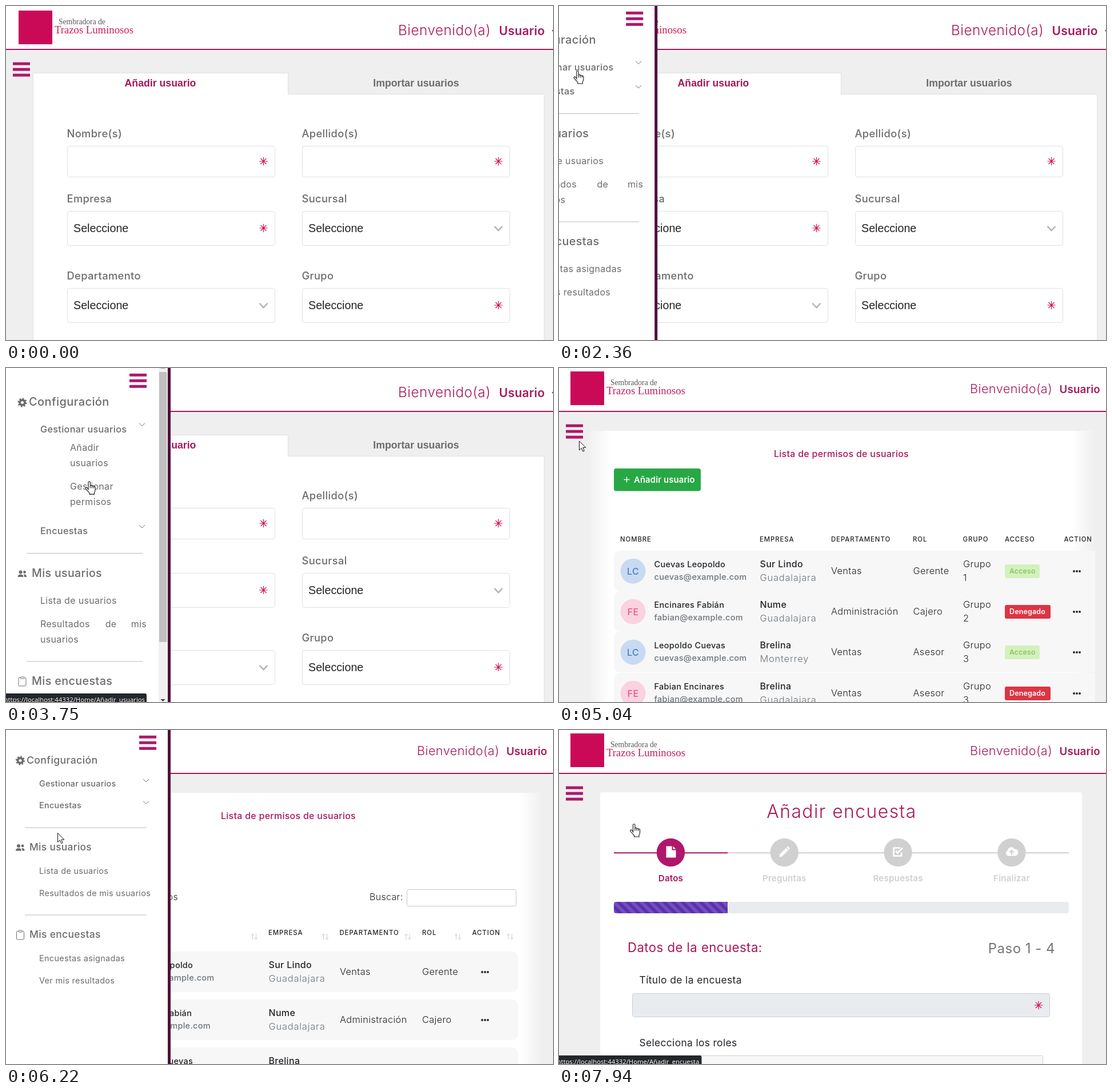
An HTML page that plays this animation: 957x585 px, repeating every 8000 ms.

```html
<!DOCTYPE html>
<html lang="es">
<head>
<meta charset="utf-8">
<title>Panel de usuarios</title>
<style>
  html, body { margin: 0; width: 100%; height: 100%; overflow: hidden; background: #efefef; }
  svg { display: block; width: 100%; height: 100%; }
  text { font-family: Inter, "Open Sans", sans-serif; letter-spacing: .02em; white-space: pre; }
  .light { font-weight: 300; }
  .mid { font-weight: 500; letter-spacing: .02em; }
  .bold { font-weight: 600; letter-spacing: .01em; }
  .airy { letter-spacing: .045em; }
  .head { font-weight: 500; letter-spacing: .9px; }
  .arial { font-family: "Liberation Sans", Arial, sans-serif; letter-spacing: 0; }
  .strong { font-weight: 700; }
  .serif { font-family: "Liberation Serif", Times, serif; letter-spacing: 0; }
  .url { font-family: "Open Sans", "Noto Sans", sans-serif; letter-spacing: 0; }
  .center { text-anchor: middle; }
  .end { text-anchor: end; }
</style>
</head>
<body>
<svg id="stage" viewBox="0 0 957 585" xmlns="http://www.w3.org/2000/svg"></svg>
<script>
const LOOP = 8000, SURVEY_START = 7670;
const WINE = '#a8185c', PINK = '#b0176a', GRAY = '#6c6c6c', INK = '#212529', MUTED = '#6c757d', BACK = '#efefef';
const stage = document.getElementById('stage');

const text = (x, y, s, size, fill, cls = '') =>
  `<text x="${x}" y="${y}" font-size="${size}" fill="${fill}" class="${cls}">${s}</text>`;
const rect = (x, y, w, h, fill, r = 0, stroke = 'none') =>
  `<rect x="${x}" y="${y}" width="${w}" height="${h}" rx="${r}" fill="${fill}" stroke="${stroke}"/>`;
const line = (d, stroke, width = 1, fill = 'none') =>
  `<path d="${d}" fill="${fill}" stroke="${stroke}" stroke-width="${width}"/>`;
const circle = (x, y, r, fill) => `<circle cx="${x}" cy="${y}" r="${r}" fill="${fill}"/>`;
const at = (x, y, body) => `<g transform="translate(${x} ${y})">${body}</g>`;
const chevron = (x, y, w, h, stroke, width) => line(`M${x - w} ${y - h / 2}l${w} ${h} ${w} ${-h}`, stroke, width);
const burger = (x, y) => [0, 10, 20].map(d => rect(x, y + d, 30, 5, PINK)).join('');
const star = (x, y) => at(x, y, line('M0-7.2V7.2M-7.2 0H7.2M-5-5L5 5M-5 5L5-5', '#d5134f', 1.2));

// CSS "ease" curve
function ease(from, to, t) {
  const p = Math.min(1, Math.max(0, (t - from) / (to - from)));
  let lo = 0, hi = 1;
  for (let i = 0; i < 20; i++) {
    const s = (lo + hi) / 2;
    if (.75 * s * (1 - s) + s ** 3 < p) lo = s; else hi = s;
  }
  return .3 * lo * (1 - lo) ** 2 + 3 * (1 - lo) * lo * lo + lo ** 3;
}

const brand = (x, y) => at(x, y,
  rect(10, 0, 59, 59, '#cb0a57') +
  text(80, 24, 'Sembradora de', 13.6, '#58585a', 'serif') +
  text(73, 40, 'Trazos Luminosos', 18.7, '#cb1c56', 'serif'));

const header = (brandX, brandY, greeting) =>
  rect(0, 0, 957, 76, '#fff') + rect(0, 75, 957, 2, WINE) + brand(brandX, brandY) + greeting + burger(12, 98.6);

// Form page
function field(x, y, h, label, required, select) {
  const mid = y + h / 2;
  return text(x - .5, y - 15.5, label, 18.3, GRAY, 'mid') +
    rect(x + .5, y + .5, 363, h, '#fff', 4, '#dedfe1') +
    (select ? text(x + 11, mid + 7, 'Seleccione', 19.7, '#222', 'arial') : '') +
    (required ? star(x + 343.5, mid) : chevron(x + 343.5, mid + .5, 7, 7.5, '#b0b0b0', 2.4));
}

const formPage =
  header(12, 8,
    text(686, 50.5, 'Bienvenido(a)', 24.3, WINE, 'light') +
    text(862.5, 50.5, 'Usuario', 21, WINE, 'bold') +
    circle(957, 43, 1.6, WINE)) +
  line('M47.5 585V117.5H493.5V154.5H941.5V585', '#dee0e3', 1, '#fff') +
  text(270, 141, 'Añadir usuario', 17.7, WINE, 'arial strong center') +
  text(717.5, 141, 'Importar usuarios', 17.7, GRAY, 'arial strong center') +
  field(107, 245, 54, 'Nombre(s)', true) +
  field(518, 245, 54, 'Apellido(s)', true) +
  field(107, 359, 60, 'Empresa', true, true) +
  field(518, 359, 60, 'Sucursal', false, true) +
  field(107, 494, 60, 'Departamento', false, true) +
  field(518, 494, 60, 'Grupo', true, true);

// Permission list page
const smallHeader = header(10, 6,
  text(719, 43.5, 'Bienvenido(a)', 21.6, WINE, 'light') + text(875.5, 43.5, 'Usuario', 18.7, WINE, 'bold'));

const people = [
  ['Cuevas Leopoldo', 'cuevas', 'LC', 'Sur Lindo', 'Guadalajara', 'Ventas', 'Gerente', 1],
  ['Encinares Fabián', 'fabian', 'FE', 'Nume', 'Guadalajara', 'Administración', 'Cajero', 2],
  ['Leopoldo Cuevas', 'cuevas', 'LC', 'Brelina', 'Monterrey', 'Ventas', 'Asesor', 3],
  ['Fabian Encinares', 'fabian', 'FE', 'Brelina', 'Guadalajara', 'Ventas', 'Asesor', 3],
];

function personRow(p, i, y, cols, width) {
  const [name, mail, initials, company, city, area, role, group] = p;
  const odd = i % 2, [nameX, companyX, areaX, roleX, dotsX] = cols;
  const access = odd
    ? rect(780, 24, 80, 24, '#dc3545', 3) + text(788, 40.3, 'Denegado', 12.5, '#fff', 'bold')
    : rect(780, 24, 61, 24, '#d2f1bd', 3) + text(788, 40.3, 'Acceso', 12.3, '#86bf55', 'mid');
  const full = width > 800;
  return at(0, y,
    rect(96, 0, width, 71, '#f7f7f7', 10) +
    circle(nameX - 37, 35.7, 22, odd ? '#fbd2df' : '#c8daf2') +
    text(nameX - 37, 42, initials, 16, odd ? '#e05c85' : '#4382bb', 'mid center') +
    text(nameX, 29, name, 14.5, INK, 'mid') +
    text(nameX, 51, mail + '@example.com', 14.5, MUTED, 'mid') +
    text(companyX, 29, company, 16, INK, 'mid') +
    text(companyX, 53, city, 16.5, MUTED, 'light airy') +
    text(areaX, 41, area, 16.4, INK, 'light') +
    text(roleX, 41, role, 16.4, INK, 'light') +
    (full ? text(707, 29, 'Grupo', 16.4, INK, 'light') + text(707, 53, group, 16.4, INK, 'light') + access : '') +
    [-5, 0, 5].map(d => circle(dotsX + d, 36, 1.9, INK)).join(''));
}

const heads = (y, list) => list.map(([x, s]) => text(x, y, s, 11.4, INK, 'head')).join('');

const listBase = smallHeader +
  rect(50, 110, 888, 475, 'url(#edges)') +
  text(494, 156, 'Lista de permisos de usuarios', 15.9, WINE, 'mid center') +
  rect(96, 176, 152, 39.4, '#28a745', 4) +
  line('M113.5 195.5h10M118.5 190.5v10', '#fff', 1.4) +
  text(131, 200.5, 'Añadir usuario', 14.8, '#fff', 'bold');

const plainList = listBase +
  heads(303.5, [[107, 'NOMBRE'], [351, 'EMPRESA'], [476, 'DEPARTAMENTO'], [619, 'ROL'],
    [706.5, 'GRUPO'], [780, 'ACCESO'], [883.5, 'ACTION']]) +
  people.map((p, i) => personRow(p, i, Math.round(320 + i * 71.2), [166.5, 351.5, 476, 619.5, 906], 860)).join('') +
  rect(938, 110, 19, 475, BACK);

const sorter = x => line(`M${x - 3} 367v-10m-2.5 3l2.5-3 2.5 3M${x + 3} 357v10m-2.5-3l2.5 3 2.5-3`, '#cfcfcf');

const richList = listBase +
  text(96, 298, 'Mostrar', 16, INK, 'light') +
  rect(163.5, 279.5, 58, 29, '#fff', 3, '#c9cdd1') + text(171, 298, '10', 14.4, INK, 'light') +
  chevron(210, 294, 4, 4, '#555', 1.4) +
  text(301, 298, 'registros', 16, INK, 'light end') +
  text(636, 298, 'Buscar:', 16, INK, 'light') +
  rect(701.5, 279.5, 191, 29, '#fff', 3, '#c4c8cc') +
  heads(359, [[143, 'NOMBRE'], [459, 'EMPRESA'], [583.5, 'DEPARTAMENTO'], [728, 'ROL'], [815.5, 'ACTION']]) +
  [434.5, 558.5, 703, 790.5, 882].map(sorter).join('') +
  people.slice(0, 3).map((p, i) => personRow(p, i, 388 + i * 84, [202.5, 459.5, 584, 728, 838], 800)).join('');

// Survey page
const stepIcons = [
  '<path d="M-8-10H2V-3H9V10H-8ZM4-10L9-5H4Z" fill="#fff"/>',
  '<path d="M-9 9l1-5L3-7l4 4L-4 8ZM4-8l2-2 4 4-2 2Z" fill="#fff"/>',
  line('M6 1V7H-7.5V-7H4M-4-2L-1 2 8-7', '#fff', 2.6),
  '<path d="M-6 7a5 5 0 0 1-1-9.5A6.5 6.5 0 0 1 5-5a5.5 5.5 0 0 1 1 12Z" fill="#fff"/>' +
    line('M0 5V-2M-3.5 1L0-2.5 3.5 1', '#d0d0d0', 2),
];
const steps = ['Datos', 'Preguntas', 'Respuestas', 'Finalizar'].map((name, i) => {
  const x = 195.5 + i * 198.8, color = i ? '#d0d0d0' : PINK;
  return circle(x, 214.5, 24.7, color) + at(x, 213.5, stepIcons[i]) +
    text(x, 265, name, 15.2, i ? '#d0d0d0' : WINE, 'bold center');
}).join('');

const surveyPage = smallHeader +
  rect(72, 109, 843, 490, '#fff', 4) +
  text(494.5, 154, 'Añadir encuesta', 31.9, WINE, 'light airy center') +
  rect(96, 214.2, 796, 2, '#d0d0d0') + rect(96, 214.2, 199, 2, PINK) + steps +
  rect(96, 301, 796, 20, '#e9ecef', 4) +
  ['#5a30b0', 'url(#stripes)'].map(fill => `<path d="M295 301V321H100a4 4 0 0 1-4-4V305a4 4 0 0 1 4-4Z" fill="${fill}"/>`).join('') +
  text(120, 389, 'Datos de la encuesta:', 22.2, WINE) +
  text(868, 391, 'Paso 1 - 4', 24, '#757575', 'end') +
  text(140.5, 443.5, 'Título de la encuesta', 17.5, INK) +
  rect(128.5, 461.5, 730, 41, '#e9ecef', 4, '#c9cdd2') + star(839, 482) +
  text(140.5, 554, 'Selecciona los roles', 17.4, INK) +
  rect(141.5, 570.5, 705, 40, '#f8f8f8', 2, '#cfcfcf');

// Side menu
const gear = (x, y) => at(x, y,
  `<g fill="none" stroke="${GRAY}"><circle r="4.4" stroke-width="3.6"/><circle r="6.8" stroke-width="2.6" stroke-dasharray="2.67"/></g>`);
const crowd = (x, y) => at(x, y,
  circle(-3, -3, 3, GRAY) + circle(4, -3, 2.4, GRAY) +
  `<path d="M-8 5.5Q-8 1-3 1T2 5.5ZM3.5 5.5Q3.5 2.5 2 1.2 7.5 0 7.5 5.5Z" fill="${GRAY}"/>`);
const clipboard = (x, y) => at(x, y, rect(-6.5, -6.5, 13, 14.5, 'none', 2, GRAY) + rect(-3, -8, 6, 3, '#fff', 1, GRAY));
const rule = (x1, x2, y) => rect(x1, y, x2 - x1, 1, '#bcbcbc');
const sublinks = (x, ys, words, size) => words.map((w, i) => text(x, ys[i], w, size, GRAY)).join('');

const scrollbar = rect(267, 0, 16, 585, '#f1f1f1') + rect(268, 7, 13.5, 473, '#c1c1c1') +
  '<path d="M270.5 1L274.5-3 278.5 1Z" fill="#999"/><path d="M270.5 580h8l-4 4Z" fill="#333"/>';

const panel = (x, body) => at(x, 0, rect(0, 0, 284, 585, '#fff') + body + rect(283, 0, 5, 585, '#4f103c'));

function formMenu(x, open) {
  const narrow = open > 50, cut = narrow ? 17 : 0;
  const link = (y, s) => text(60, y, s, 16, GRAY);
  const rest = rect(0, 124, 283, 800, '#fff') +
    text(60, 155, 'Encuestas', 16.2, GRAY, 'mid') + chevron(255 - cut, 141.5, 5, 5, GRAY, 1) +
    rule(36, 255 - cut + 1, 188) +
    crowd(28.5, 224.5) + text(45, 229.5, 'Mis usuarios', 19.5, GRAY, 'mid') +
    link(276.5, 'Lista de usuarios') + link(318, 'Resultados') +
    text(202 - cut / 2, 318, 'de', 16, GRAY, 'end') + text(263 - cut, 318, 'mis', 16, GRAY, 'end') +
    link(344.5, 'usuarios') +
    rule(36, 255 - cut + 1, 377.5) +
    clipboard(28.5, 413) + text(45, 419, 'Mis encuestas', 19.7, GRAY, 'mid') +
    link(465.5, 'Encuestas asignadas') + link(507, 'Ver mis resultados');
  return panel(x,
    gear(28.5, 60.5) + text(40, 66, 'Configuración', 20, GRAY, 'mid') +
    text(60, 112.5, 'Gestionar usuarios', 16.2, GRAY, 'mid') + chevron(255 - cut, 99, 5, 5, GRAY, 1) +
    sublinks(112, [145, 172, 213, 240], ['Añadir', 'usuarios', 'Gestionar', 'permisos'], 16) +
    at(0, open, rest) + burger(233 - cut, 9.8) + (narrow ? scrollbar : ''));
}

function listMenu(x, open) {
  const link = (y, s) => text(58, y, s, 14.5, GRAY);
  const rest = rect(0, 148, 283, 800, '#fff') +
    rule(33, 246, 170.5) +
    crowd(25, 206) + text(41, 210.5, 'Mis usuarios', 17.3, GRAY, 'mid') +
    link(252, 'Lista de usuarios') + link(290.5, 'Resultados de mis usuarios') +
    rule(33, 246, 323.5) +
    clipboard(25, 359) + text(41, 364, 'Mis encuestas', 17.4, GRAY, 'mid') +
    link(405, 'Encuestas asignadas') + link(443.5, 'Ver mis resultados');
  return panel(x,
    gear(25, 53.5) + text(36, 58.5, 'Configuración', 17.7, GRAY, 'mid') +
    text(58, 98.5, 'Gestionar usuarios', 14.4, GRAY, 'mid') + chevron(245, 88.5, 5, 5, GRAY, 1) +
    text(58, 137, 'Encuestas', 14.4, GRAY, 'mid') + chevron(245, 127, 5, 5, GRAY, 1) +
    sublinks(106, [168, 192, 229, 253], ['Añadir', 'encuesta', 'Gestionar', 'encuestas'], 14.5) +
    at(0, open, rest) + burger(233, 9.8));
}

// Link preview: start, path, width
const previews = [
  [0], [2680, 'Añadir_usuarios#settings', 295], [3480, 'Añadir_usuarios', 246],
  [3820, 'Gestionar_permisos', 265], [4690], [6500, 'Gestionar_permisos#settings', 315],
  [7050, 'Añadir_encuesta', 249.5],
];
function preview(t) {
  const [, path, width] = previews.findLast(p => p[0] <= t);
  return path ? rect(-5, 570, width + 5, 30, '#23262b', 3) +
    text(-3.5, 585, 'https://localhost:44332/Home/' + path, 11.3, '#fff', 'url') : '';
}

// Pointer hotspot: time, x, y, shape
const track = [
  [0, 0, 0, ''], [720, 114, 467, 'arrow'], [790, 0, 0, ''],
  [1120, 67, 125, 'arrow'], [1400, 40, 115, 'hand'], [1800, 25, 102, 'hand'], [1930, 25, 102, 'hand'],
  [2360, 32, 113, 'hand'], [2690, 117.5, 112, 'hand'], [3130, 118, 112, 'hand'],
  [3480, 135, 155, 'hand'], [3750, 145.5, 198, 'hand'], [3880, 146, 211, 'hand'], [4020, 146, 211, 'hand'],
  [4290, 138, 233, 'hand'], [4430, 138, 233, 'arrow'], [4690, 138, 233, 'arrow'],
  [5040, 35, 127.5, 'arrow'], [5260, 28, 108, 'hand'], [5460, 27, 104, 'hand'], [5700, 27, 106, 'arrow'],
  [6220, 90, 180, 'arrow'], [6360, 90, 180, 'arrow'], [6500, 104, 128, 'hand'], [6800, 106, 128, 'hand'],
  [7120, 117, 152, 'hand'], [7190, 117, 152, 'hand'], [7530, 131, 164, 'hand'], [LOOP, 131, 164, 'hand'],
];
const shapes = {
  '': '',
  arrow: line('M.5.5V16.5L4.2 13 6.8 18.7 9.2 17.7 6.7 12H11.8Z', '#111', 1, '#fff'),
  hand: at(-7, 0, line('M5.5 14.5V2.5Q5.5.7 7.2.7T8.9 2.5V8.5Q9 7.3 10.6 7.4T12 9Q12.4 8 13.8 8.3' +
    'T15 9.8Q16 9 17 9.6T17.6 11V15Q17.6 18 16 20V23H7.5V20.5L1 13.5Q.2 12 1.4 11.2T3.8 12Z' +
    'M8.9 8.5V12.5M12 9V12.5M15 9.8V12.5', '#111', 1.1, '#fff')),
};
function pointer(t) {
  const i = track.findLastIndex(k => k[0] <= t);
  const [t0, x0, y0, shape] = track[i], [t1, x1, y1, next] = track[i + 1];
  const p = next ? (t - t0) / (t1 - t0) : 0;
  return at(x0 + (x1 - x0) * p, y0 + (y1 - y0) * p, shapes[shape]);
}

const defs = t => `<defs>
  <linearGradient id="edges"><stop offset="0" stop-color="${BACK}"/><stop offset=".045" stop-color="#fff"/>
    <stop offset=".955" stop-color="#fff"/><stop offset="1" stop-color="${BACK}"/></linearGradient>
  <pattern id="stripes" width="16" height="16" patternUnits="userSpaceOnUse"
    patternTransform="translate(${96 - (t - SURVEY_START) * .016} 301)">
    <path d="M0 8L8 16H0ZM0 0H8L16 8V16Z" fill="#fff" fill-opacity=".15"/></pattern></defs>`;

function scene(t) {
  if (t < 4430) {
    const slide = ease(2188, 2688, t);
    return formPage + (slide ? formMenu(288 * (slide - 1), 136 * ease(3200, 3550, t)) : '');
  }
  if (t < SURVEY_START) {
    const slide = ease(5560, 6060, t);
    return (t < 5200 ? plainList : richList) +
      (slide ? listMenu(288 * (slide - 1), 118 * ease(6650, 7000, t)) : '');
  }
  return surveyPage;
}

function draw() {
  const t = performance.now() % LOOP;
  stage.innerHTML = defs(t) + rect(0, 0, 957, 585, BACK) + scene(t) + preview(t) + pointer(t);
  requestAnimationFrame(draw);
}
draw();
</script>
</body>
</html>
```
